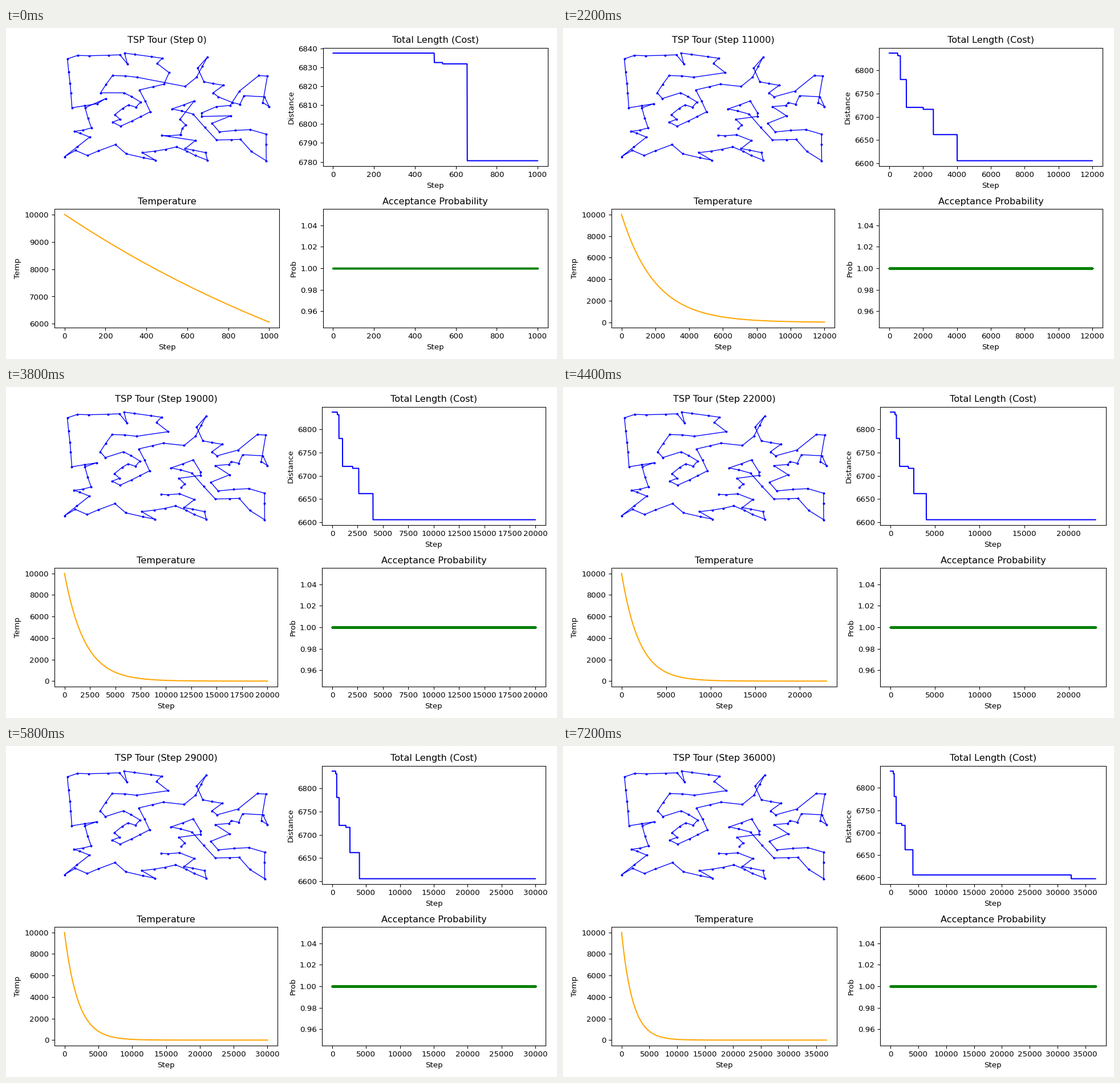
Animation of 966 by 580 pixels, one loop 7400 ms. Source, as a matplotlib script:

```python
import numpy as np
import matplotlib.pyplot as plt
from matplotlib.animation import FuncAnimation

W, H, DPI = 966, 580, 96.6
BLOCK = 1000            # annealing steps per picture
FRAMES = 37
COOLING, T_START, T_END = 0.9995, 1e4, 1e-4
TOTAL = int(np.log(T_END / T_START) / np.log(COOLING)) + 2

# Steps at which the tour improves, and the length between them
DROPS = [495, 536, 656, 1010, 2005, 2607, 4012, 32460]
LENGTHS = [6837.6, 6832.6, 6831.9, 6780.6, 6720.4, 6716.2, 6661.7, 6605.3, 6596.8]

steps = np.arange(TOTAL)
cost = np.array(LENGTHS)[np.searchsorted(DROPS, steps, side="right")]
temp = T_START * COOLING ** steps
prob = np.ones(TOTAL)

rng = np.random.default_rng(4)


def stretch(*corners, gap=28):
    """Cities along a bent line: its corners and loose stops on long legs."""
    cities = [corners[0]]
    for a, b in zip(corners, corners[1:]):
        a, b = np.array(a), np.array(b)
        stops = int(np.hypot(*(b - a)) // gap)
        for k in range(1, stops + 1):
            t = (k + rng.uniform(-0.25, 0.25)) / (stops + 1)
            cities.append(tuple(a + (b - a) * t + rng.uniform(-1, 1, 2)))
        cities.append(tuple(b))
    return cities


# Corners of each stretch, y pointing down
pier = stretch((306, 187), (273, 188), gap=18)
south = stretch((332, 197), (314, 211), (350, 218), (353, 231), (299, 208),
                (239, 218), (262, 231), (211, 220), (192, 204), (143, 223),
                (122, 214), (103, 225), (147, 191), (120, 181), (150, 175),
                (139, 140))
spur = [(175, 124)]
coast = stretch((160, 133), (116, 140), (114, 114), (108, 55), (126, 49),
                (200, 48), (213, 64), (208, 45), (274, 54), (265, 63), (286, 79))
inner = stretch((277, 99), (234, 109), (253, 147), (201, 172), (187, 165),
                (200, 160), (191, 152), (215, 135), (228, 139), (236, 130), (207, 114))
ridge = stretch((166, 114), (187, 84), (230, 87))
middle = stretch((314, 103), (334, 87), (353, 52), (336, 71), (347, 95),
                 (381, 101), (363, 114), (372, 121))
fan = stretch((397, 131), (410, 134), (417, 119), (453, 121), (461, 138),
              (450, 131), (458, 85), (443, 84), (409, 111), gap=50)
hook = stretch((393, 136), (369, 138))
stray = [(343, 149), (343, 155)]
back = stretch((394, 154), (361, 167), (374, 182), (428, 178), (456, 186),
               (456, 232), (430, 216), (411, 195), (369, 196), (328, 151),
               (291, 142), (330, 128), gap=38)
end = stretch((305, 160), (315, 170), (309, 176))


def tour(step):
    """Cities in visiting order, with every move made before this step."""
    stage = np.searchsorted(DROPS, step)

    def turn(part, since):
        return part[::-1] if stage >= since else part

    def swap(part, since):
        """The part's old and new place, one of them empty."""
        return ([], part) if stage >= since else (part, [])

    spur_old, spur_new = swap(spur, 4)
    stray_old, stray_new = swap(stray, 6)
    loop = inner + spur_new + ridge
    path = (turn(pier, 1) + south + spur_old + coast + turn(loop, 3) + middle
            + turn(fan, 7) + hook + stray_old + back + stray_new + end
            + swap(pier[:1], 1)[0])
    x, y = np.array(path).T
    return x, -y


# The tiny surplus keeps rounding from losing a pixel
fig, axes = plt.subplots(2, 2, figsize=((W + 0.01) / DPI, (H + 0.01) / DPI), dpi=DPI)
map_ax, cost_ax, temp_ax, prob_ax = axes.flat

map_line, = map_ax.plot(*tour(0), "o-", color="blue", ms=2, lw=1)
map_ax.axis("off")


def chart(ax, title, ylabel, values, color, **style):
    ax.set(title=title, xlabel="Step", ylabel=ylabel)
    line, = ax.plot([], [], color=color, **style)
    return ax, line, values


charts = [
    chart(cost_ax, "Total Length (Cost)", "Distance", cost, "blue"),
    chart(temp_ax, "Temperature", "Temp", temp, "orange"),
    chart(prob_ax, "Acceptance Probability", "Prob", prob, "green",
          ls="none", marker=".", ms=3),
]


def update(i):
    step = i * BLOCK
    n = min(step + BLOCK + 1, TOTAL)
    map_line.set_data(*tour(step))
    map_ax.set_title(f"TSP Tour (Step {step})")
    for ax, line, values in charts:
        line.set_data(steps[:n], values[:n])
        ax.relim()
        ax.autoscale_view()
    # Fit the layout from the default margins each time
    fig.subplots_adjust(left=0.125, right=0.9, bottom=0.11, top=0.88,
                        wspace=0.2, hspace=0.2)
    fig.tight_layout()
    return []


anim = FuncAnimation(fig, update, frames=FRAMES, interval=200,
                     init_func=lambda: update(0), repeat=True, repeat_delay=0)
plt.show()
```
